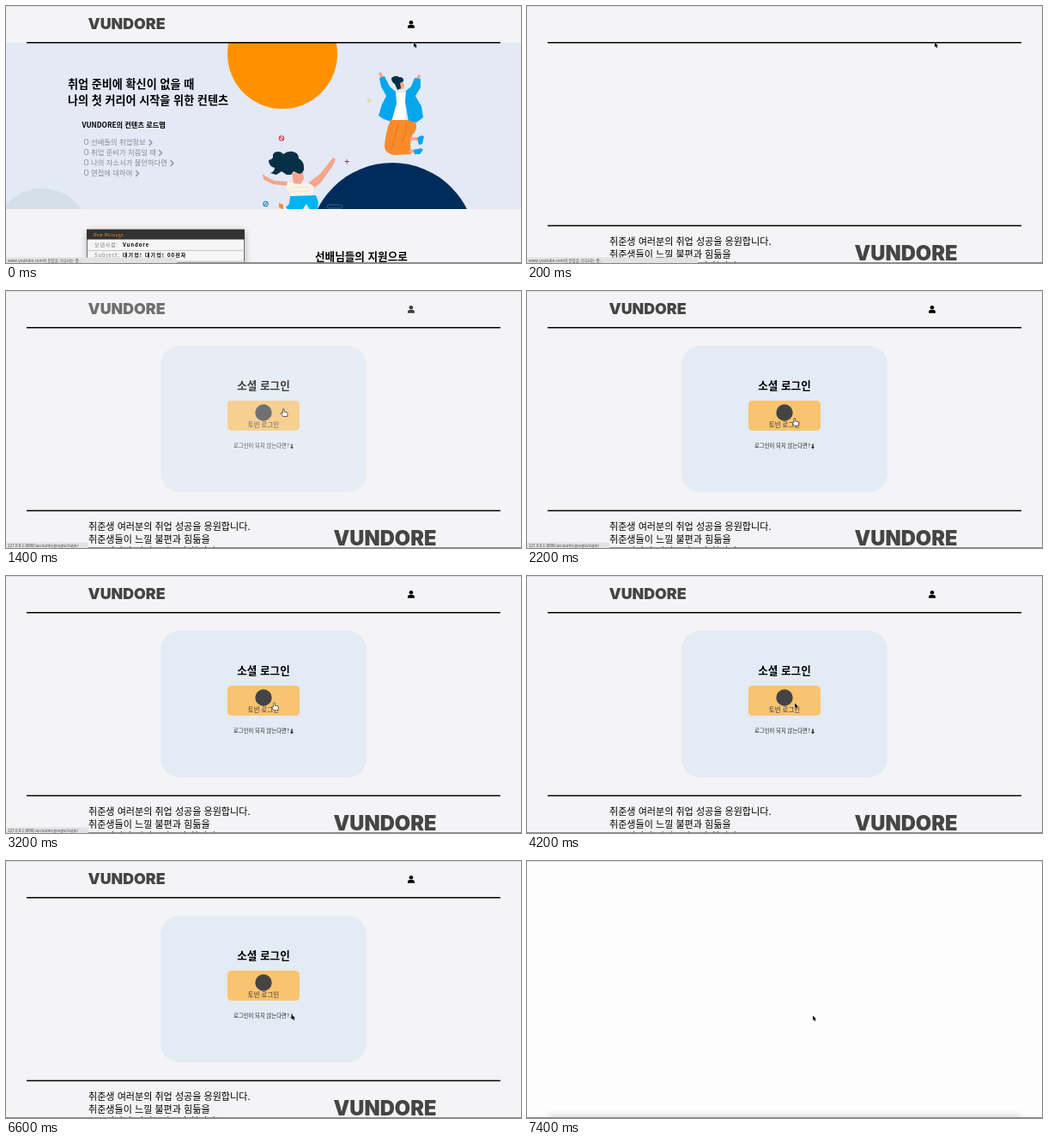
Write an HTML page that moves like this. It is 600 by 300 pixels and loops after 8000 ms.

```html
<!DOCTYPE html>
<html lang="ko">
<head>
<meta charset="utf-8">
<title>Login</title>
<style>
html, body { margin: 0; width: 100%; height: 100%; overflow: hidden; background: #f4f4f6; }
svg { display: block; width: 600px; height: 300px; }
text { font-family: "Noto Sans CJK KR", "Noto Sans CJK", "Noto Sans CJK JP", sans-serif; white-space: pre; }
.brand { font-family: Inter, sans-serif; font-weight: 900; fill: #454545; }
.b { font-weight: 700; }
.mid { text-anchor: middle; }
.list { font-size: 8.33px; font-weight: 500; fill: #8c8c8c; }
.mail { font-size: 6px; letter-spacing: .9px; }
.foot { font-size: 11.07px; font-weight: 500; }
.status { font-size: 4.6px; fill: #444; }
.line { fill: none; stroke-linecap: round; stroke-linejoin: round; }
</style>
</head>
<body>
<svg viewBox="0 0 600 300">
  <defs>
    <clipPath id="heroClip"><rect y="43" width="600" height="194"/></clipPath>
    <filter id="soft" x="-10%" y="-200%" width="120%" height="500%"><feGaussianBlur stdDeviation="4"/></filter>
  </defs>
  <rect id="bg" width="600" height="300" fill="#f4f4f6"/>

  <g id="page">
    <g id="head">
      <text class="brand" x="95.5" y="27" font-size="17.8">VUNDORE</text>
      <circle cx="472" cy="19.2" r="2.3"/>
      <path d="M468 25.800v-1.300q0-2.600 2.600-2.600h2.800q2.600 0 2.600 2.600v1.300z"/>
    </g>

    <g id="home">
      <g clip-path="url(#heroClip)">
        <rect y="43" width="600" height="194" fill="#e3e9f5"/>
        <circle cx="322" cy="56" r="64" fill="#ff9100"/>
        <circle cx="42" cy="269" r="56" fill="#d5dfe9"/>
        <circle cx="450" cy="280" r="97" fill="#002c5c"/>

        <g id="dancer">
          <path class="line" d="M436 79l3 6M481 82l-2 6" stroke="#f4a58c" stroke-width="3.500"/>
          <path d="M452 102l13-1 2 14-2 19-14 0-1-18z" fill="#fff"/>
          <path d="M435 84l6-2 6 12 7 6 1 14-6 21-9-3-6-4 4-13 5-10-6-11zM476 84l7 1 0 10-6 10 7 12 2 13-8 6-9-1-4-23 1-13 6-5z" fill="#04a6ec"/>
          <circle cx="459.500" cy="93" r="4.500" fill="#f4a58c"/>
          <path d="M449 84q5-4 9-1 6 0 5 5l-4 2 1 6-4 2-3-7q-4-2-4-7z" fill="#073046"/>
          <path d="M448 133l20 0 10 4q1 9-5 14l-2 11 1 11-19 1q-12-2-12-10 1-17 7-31z" fill="#f98a2c"/>
          <path class="line" d="M472 155l8 0M471 170l6-1" stroke="#f4a58c" stroke-width="3.500"/>
          <path d="M479 154l5-3 3 1-2 9-4 1zM475 168l9-2 2 2-4 5-6 0z" fill="#04a6ec"/>
          <path class="line" d="M457 137l-3 14-4 12M466 138l0 10-5 11" stroke="#d96d12" stroke-width=".7"/>
        </g>

        <g id="jumper">
          <path class="line" d="M302 201l10 5 20 2" stroke="#f4a58c" stroke-width="4.500"/>
          <path d="M350 208l16-12 11-14 4-5 3 2-3 7-14 20-11 9z" fill="#f4a58c"/>
          <path class="line" d="M302 201l-2-3" stroke="#f4a58c" stroke-width="2.500"/>
          <path d="M328 205l12 2 12-1 7 5-2 9 3 12-30 3 1-17-5-5z" fill="#faf4e6"/>
          <path class="line" d="M333 212l20-1M334 217l20-1M335 222l20-1" stroke="#e5dac2" stroke-width=".8" stroke-dasharray="1 2"/>
          <path d="M333 195l13-2 1 9-4 6-8-1z" fill="#f4a58c"/>
          <path d="M306 180q3 0 5-3-1-7 6-7 4 0 6 3 5-4 11-3 7 1 7 8 6 3 6 10 1 6-5 8l-7-3-3 4-5 0-6-4-6 4-7-2q5-2 5-6-7-2-7-9z" fill="#073046"/>
          <path d="M331 222l30-1 3 8-1 9h-9l-4-7-5 7-16 0-3-3 4-4z" fill="#00b4f2"/>
          <path d="M318 230l5 2 0 6-5-3z" fill="#f98a2c"/>
        </g>

        <g class="line" stroke-width="1.1">
          <circle cx="321" cy="154.500" r="2.700" stroke="#e33b4e"/>
          <path d="M319.500 153.500l3 2" stroke="#e33b4e"/>
          <circle cx="302.500" cy="231" r="2.700" stroke="#2388b8"/>
          <path d="M301.500 232l2-2" stroke="#2388b8"/>
          <path d="M420.500 110.500h5M423 108v5" stroke="#f3cf85"/>
          <path d="M395 181.500h4.500M397.200 179.500v4.500" stroke="#8f4377" stroke-width="1"/>
          <rect x="374" y="232" width="18" height="4" rx="2" stroke="#25628c" stroke-width="1"/>
        </g>
      </g>

      <g class="b" font-size="13.1">
        <text x="72" y="96">취업 준비에 확신이 없을 때</text>
        <text x="72" y="115.300">나의 첫 커리어 시작을 위한 컨텐츠</text>
        <text x="88.500" y="142" font-size="8.2">VUNDORE의 컨텐츠 로드맵</text>
      </g>
      <g class="list">
        <text x="90.500" y="162.300">O 선배들의 취업정보</text>
        <text x="90.500" y="174.300">O 취업 준비가 처음일 때</text>
        <text x="90.500" y="186.300">O 나의 자소서가 불안하다면</text>
        <text x="90.500" y="198.300">O 면접에 대하여</text>
      </g>
      <path class="line" stroke="#8c8c8c" stroke-width="1.200" d="M167 156.500l3 3-3 3M178.500 168.500l3 3-3 3M192 180.500l3 3-3 3M151.500 192.500l3 3-3 3"/>

      <rect x="95" y="263" width="183" height="42" opacity=".3" filter="url(#soft)"/>
      <rect x="94.500" y="261" width="183" height="42" fill="#f6f6f7" stroke="#555" stroke-width=".8"/>
      <rect x="94" y="261" width="184" height="11.500" fill="#333"/>
      <text x="102" y="268.600" font-size="4.5" letter-spacing=".6" fill="#f29a1f">New Message</text>
      <path d="M95 285.500h183M95 298h183" stroke="#bbb" stroke-width=".8"/>
      <g class="mail">
        <text x="103" y="281" fill="#777">보낸사람:</text>
        <text x="136" y="281" class="b">Vundore</text>
        <text x="103" y="293.300" fill="#777">Subject:</text>
        <text x="136" y="293.300" class="b" letter-spacing="1.1">대기업! 대기업! 00전자</text>
      </g>
      <text x="360" y="297" class="b" font-size="12.6">선배님들의 지원으로</text>
    </g>

    <g id="login">
      <g id="card">
        <rect x="180" y="64" width="240" height="171" rx="22" fill="#e3ebf5"/>
        <text class="b mid" x="300" y="115.300" font-size="12.6">소셜 로그인</text>
        <rect id="button" x="258" y="128" width="84" height="35" rx="4.500"/>
        <circle cx="300" cy="142" r="9.700" fill="#444"/>
        <text class="mid" x="300" y="158.800" font-size="7.45" font-weight="500" fill="#333">토빈 로그인</text>
        <text x="265" y="183.400" font-size="6.35" font-weight="500" fill="#222">로그인이 되지 않는다면?</text>
        <path d="M332.300 178.500h1.400v3.500h1.300l-2 2.500-2-2.500h1.300z" fill="#222"/>
      </g>
      <rect x="24" y="255.700" width="552" height="1.500"/>
      <g class="foot">
        <text x="96" y="279.300">취준생 여러분의 취업 성공을 응원합니다.</text>
        <text x="96" y="293.500">취준생들이 느낄 불편과 힘듦을</text>
        <text x="96" y="307.500">조금이나마 덜어드리고자 합니다</text>
      </g>
      <text class="brand" x="381.500" y="297" font-size="23.7">VUNDORE</text>
    </g>
    <rect x="24" y="42" width="552" height="1.500"/>
  </g>

  <rect id="glow" x="24" y="298" width="552" height="6" opacity=".2" filter="url(#soft)"/>
  <rect y="299" width="600" height="1" fill="#8c8c8e"/>
  <rect width="600" height="1" fill="#dedee0"/>
  <g id="waiting">
    <rect x="-3" y="293.500" width="202" height="10" rx="2" fill="#e2e2e4"/>
    <text class="status" x="2" y="299.300">www.youtube.com의 응답을 기다리는 중...</text>
  </g>
  <g id="link">
    <rect x="-3" y="293.500" width="99" height="10" rx="2" fill="#e2e2e4"/>
    <text class="status" x="2" y="299.300">127.0.0.1:8000/accounts/google/login/</text>
  </g>

  <g id="cursor">
    <path id="arrow" d="M0 .5v5.500l1.300-1.100 1 2.100 1-.5-1-2h1.700z" stroke="#fff" stroke-width=".5" paint-order="stroke"/>
    <path id="hand" d="M-1 0q1-1 1.800 0v3l3 .6q1 .4 1 1.500l-.6 3.400h-4.800l-2.600-4q.6-1 2.200.2z" fill="#fff" stroke="#222" stroke-width=".7"/>
  </g>
</svg>
<script>
const $ = id => document.getElementById(id);
const show = (id, on) => { $(id).style.display = on ? '' : 'none'; };
const LOOP = 8000, STEP = 200;

// time, x, y of the pointer tip
const path = [
  [0, 475, 42], [400, 475, 42], [1000, 344, 120], [1600, 313, 147], [2200, 312, 149],
  [3600, 313, 148], [4200, 312, 148], [5400, 317, 150], [6600, 333, 179], [7000, 333, 180], [8000, 333, 180]
];

function pointer(t) {
  const i = path.findIndex(k => k[0] > t);
  const [a, b] = [path[i - 1], path[i]];
  const p = (t - a[0]) / (b[0] - a[0]);
  return [a[1] + (b[1] - a[1]) * p, a[2] + (b[2] - a[2]) * p];
}

function draw(now) {
  const t = Math.floor(now % LOOP / STEP) * STEP;
  const home = t < 200, blank = t >= 7000;
  const hover = t >= 1400 && t < 3800;
  const fade = t < 600 ? 0 : Math.min(1, (t - 350) / 1400);

  show('page', !blank);
  show('home', home);
  show('login', !home);
  show('glow', blank);
  show('waiting', t < 600);
  show('link', hover);
  show('arrow', !hover);
  show('hand', hover);

  $('bg').setAttribute('fill', blank ? '#fdfdfd' : '#f4f4f6');
  $('head').style.opacity = home ? 1 : fade;
  $('card').style.opacity = fade;
  $('button').setAttribute('fill', t < 1400 ? '#ffb440' : '#f9c470');
  $('cursor').setAttribute('transform', `translate(${pointer(t)})`);
}

const start = performance.now();
function tick() {
  draw(performance.now() - start);
  requestAnimationFrame(tick);
}
draw(0);
tick();
</script>
</body>
</html>
```
